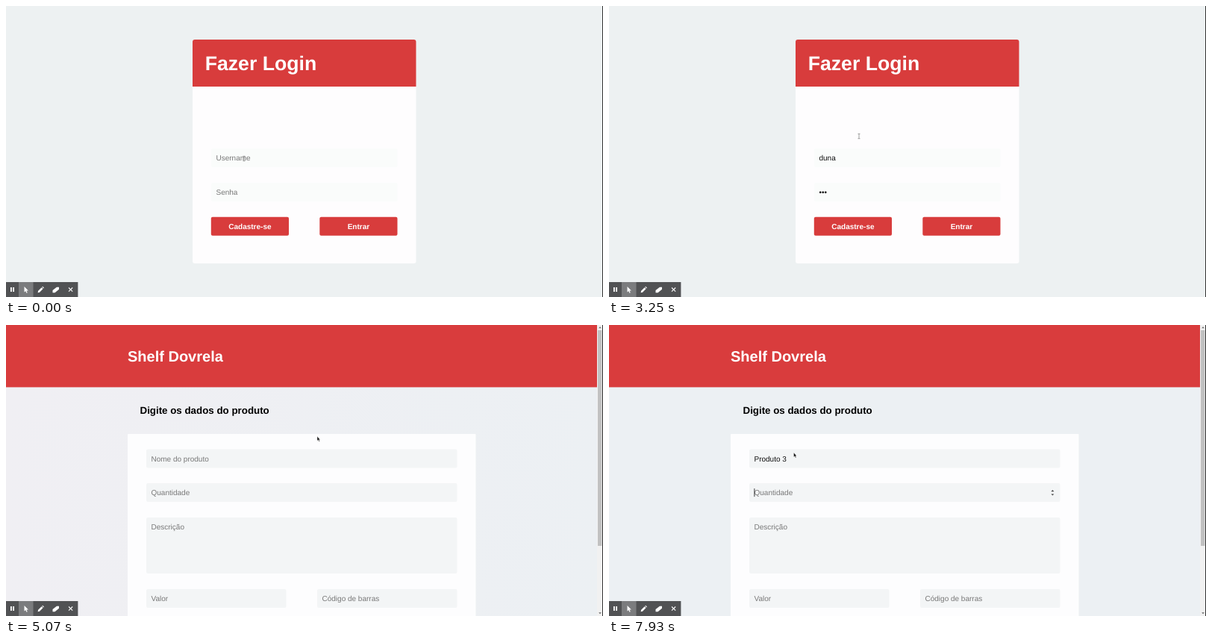
Animation, 800 px wide and 390 px high, one loop 8000 ms. Source, as an HTML page:

```html
<!DOCTYPE html>
<html lang="pt-BR">
<head>
<meta charset="utf-8">
<title>Login e cadastro</title>
<style>
html, body { margin: 0; width: 100%; height: 100%; overflow: hidden; }
svg { display: block; width: 100vw; height: 100vh; font-family: "Liberation Sans", Arial, sans-serif; }
text { white-space: pre; text-rendering: geometricPrecision; }
.b { font-weight: bold; }
.w { fill: #fff; }
.mid { text-anchor: middle; }
.end { text-anchor: end; }
.icon { fill: none; stroke-width: 1.1; stroke-linejoin: round; stroke-linecap: round; }
</style>
</head>
<body>
<svg id="stage" viewBox="0 0 800 390"></svg>
<script>
const LOOP = 8000, STEP = 130;
const LIST_AT = 3380, FORM_AT = 4810, TINT_AT = 6240;
const RED = '#d83c3c';

const rect = (x, y, w, h, fill, r = 0, more = '') =>
  `<rect x="${x}" y="${y}" width="${w}" height="${h}" fill="${fill}" rx="${r}" ${more}/>`;
const text = (x, y, size, str, cls = '', more = '') =>
  `<text x="${x}" y="${y}" font-size="${size}" class="${cls}" ${more}>${str}</text>`;
const path = (d, more = '') => `<path d="${d}" ${more}/>`;
const group = (id, body) => `<g id="${id}">${body}</g>`;

const field = (id, x, y, w, h, hint, fill = '#f3f5f6') =>
  rect(x, y, w, h, fill, 2) + text(x + 6.5, y + 16.1, 10, hint, '', `id="${id}" fill="#787878"`);
const button = (x, y, label, fill, id = '') =>
  rect(x, y, 104.2, 25, fill, 2, id && `id="${id}"`) + text(x + 52.1, y + 15.8, 10, label, 'b w mid');

function product(dy, name, stock, price, code) {
  const lines = [
    'Lorem ipsum dolor sit amet consectetur adipisicing elit. Ut odio quidem',
    'nobis aspernatur error est beatae, enim incidunt sed possimus deleniti',
    'magni! Dolores harum consectetur quod in nisi commodi sint.'
  ];
  const facts = [[210.7, 'Em estoque: ' + stock], [227.7, 'Valor: R$ ' + price],
    [244.7, 'Código de barras:'], [253.4, code]];
  const frame = y => rect(587.7, y, 24.8, 24.8, '#fff', 1.7, 'stroke="#e27c7c" stroke-width=".83"');
  return `<g transform="translate(0 ${dy})">` +
    rect(163, 191.5, 466.5, 76.5, '#fdfdfe', 1) +
    text(179.5, 211, 12.5, name, 'b') +
    lines.map((s, i) => text(179.5, 227.4 + i * 13.3, 7.5, s, '', 'fill="#111"')).join('') +
    facts.map(([y, s]) => text(542, y, 7.5, s, 'b end')).join('') +
    frame(199.8) + frame(233.8) +
    path('M600 207.5h-4v8h8v-4M598.6 213l.5-2 4.6-4.6 1.5 1.5-4.6 4.6z', 'class="icon" stroke="#2c9f2c"') +
    path('M596 242h8M598.5 242v-1.6h3v1.6M597 242v7.6h6V242', 'class="icon" stroke="#dc2030"') + '</g>';
}

const scrollbar = end =>
  rect(792, 0, 7, 390, '#f1f1f1') + rect(793, 7, 5.4, end - 7, '#c1c1c1') +
  path('M794.2 4.3l1.8-2 1.8 2z', 'fill="#666"') + path('M794.2 385.3l1.8 2 1.8-2z', 'fill="#666"');
const header = rect(0, 0, 792, 83.4, '#d93c3d') + text(163, 48.5, 20, 'Shelf Dovrela', 'b w');

const login = rect(0, 0, 800, 390, '#edf1f2') +
  rect(250, 45, 299.5, 300, '#fefdfe', 3) +
  path('M250 108V48a3 3 0 0 1 3-3h293.5a3 3 0 0 1 3 3v60z', `fill="${RED}"`) +
  text(266.7, 86, 26.67, 'Fazer Login', 'b w') +
  field('user', 275, 191, 249.5, 25, 'Username', '#fafcfb') +
  field('pass', 275, 237, 249.5, 25, 'Senha', '#fafcfb') +
  button(274.8, 282.7, 'Cadastre-se', RED) + button(420.3, 282.7, 'Entrar', RED);

const list = header + scrollbar(325) +
  button(525.2, 125, 'Cadastrar Produto', '#dc4b4b', 'add') +
  product(0, 'Produto 1', 3, '35.9', '494959') +
  product(80.8, 'Produto 2', 6, '15.0', '41949494');

const form = header + scrollbar(296) +
  text(179.5, 119, 13.33, 'Digite os dados do produto', 'b') +
  rect(163, 146, 466.5, 250, '#fdfdfe', 1) +
  field('name', 188, 166.5, 416.5, 25, 'Nome do produto') +
  field('qty', 188, 212, 416.5, 25, 'Quantidade') +
  field('desc', 188, 258, 416.5, 75, 'Descrição') +
  field('price', 188, 354, 187.5, 25, 'Valor') +
  field('code', 417, 354, 187.5, 25, 'Código de barras') +
  group('spin', path('M592.4 223.2l2-2.2 2 2.2zM592.4 226.4l2 2.2 2-2.2z', 'fill="#444"'));

const toolbar = rect(0, 370, 96.4, 20, '#515254') + rect(17, 370, 19.5, 20, '#7b7c7e') +
  rect(6, 377, 1.8, 6, '#fff') + rect(9.2, 377, 1.8, 6, '#fff') +
  path('M24.5 376v7.6l1.8-1.6 1.2 2.8 1.2-.5-1.2-2.7h2.4z', 'class="w"') +
  path('M42.6 384.2l.5-2.4 4.6-4.6 1.9 1.9-4.6 4.6zM48.3 376.6l.8-.8 1.9 1.9-.8.8z', 'class="w"') +
  path('M62.5 381l5.5-4.2h3v3l-5.5 4.4h-3z', 'class="w"') +
  path('M84 377.5l5.2 5.2M89.2 377.5l-5.2 5.2', 'stroke="#fff" stroke-width="1.1"');

const pointers =
  group('beam', path('M-1.5-3.2H1.5M0-3.2V3.2M-1.5 3.2H1.5', 'fill="none" stroke="#888" stroke-width=".8"')) +
  group('arrow', path('M0 0v6l1.4-1.2 1 2.2 1-.4-1-2.1H4z', 'fill="#111" stroke="#fff" stroke-width=".4"')) +
  group('hand', path('M-1 0.6Q0-.6.8.6V3.6L3.6 4.3V7L2.8 9.4H-1.2L-3 6.4-2.4 5.4-1 6.4z',
    'fill="#fff" stroke="#222" stroke-width=".7"'));

const $ = id => document.getElementById(id);
$('stage').innerHTML =
  '<linearGradient id="wash"><stop stop-color="#f0eff3"/><stop offset="1" stop-color="#ecf0f3"/></linearGradient>' +
  rect(0, 0, 800, 390, 'url(#wash)', 0, 'id="back"') +
  group('login', login) + group('list', list) + group('form', form) +
  rect(0, 0, 0.8, 11, '#111', 0, 'id="caret"') + group('pointer', pointers) +
  rect(799, 0, 1, 390, '#333') + toolbar;

const show = (id, on) => $(id).style.display = on ? '' : 'none';

// Pointer stops: time, x, y
const stops = [[0, 319, 204.5], [390, 320, 204.5], [2730, 320, 204.5], [3250, 335, 174.5],
  [3380, 327, 179.2], [3640, 330, 180], [4290, 567, 142], [4680, 567, 142],
  [5460, 267, 156.5], [5850, 247.5, 171], [LOOP, 247.5, 171]];

function pointerAt(t) {
  const i = stops.findIndex(s => s[0] > t), [t0, x0, y0] = stops[i - 1], [t1, x1, y1] = stops[i];
  const p = (t - t0) / (t1 - t0), e = p * p * (3 - 2 * p);
  return [x0 + (x1 - x0) * e, y0 + (y1 - y0) * e];
}

// Typed inputs: id, hint, value, focus, first key, gap between keys, blur
const inputs = [
  ['user', 'Username', 'duna', 260, 520, 130, 1170],
  ['pass', 'Senha', '•••', 1170, 1430, 260, 3250],
  ['name', 'Nome do produto', 'Produto 3', 6240, 6370, 91, 7410],
  ['qty', 'Quantidade', '', 7410, LOOP, 1, LOOP]
];

function type(t, [id, hint, value, focus, first, gap, blur]) {
  const el = $(id), n = t < first ? 0 : Math.floor((t - first) / gap) + 1;
  const typed = value.slice(0, n);
  el.textContent = typed || hint;
  el.setAttribute('fill', typed ? '#111' : '#787878');
  if (t < focus || t >= blur) return;
  const idle = t - (typed ? Math.min(t, first + (typed.length - 1) * gap) : focus);
  const caret = $('caret');
  show('caret', idle % 1060 < 530);
  caret.setAttribute('x', +el.getAttribute('x') + (typed ? el.getComputedTextLength() : 0));
  caret.setAttribute('y', el.getAttribute('y') - 9);
}

function draw(now) {
  const t = Math.floor(now % LOOP / STEP) * STEP;
  show('login', t < LIST_AT);
  show('list', t >= LIST_AT && t < FORM_AT);
  show('form', t >= FORM_AT);
  show('spin', t >= 7410);
  $('back').setAttribute('fill', t < TINT_AT ? 'url(#wash)' : '#ecf0f3');

  show('caret', false);
  inputs.filter(f => (f[3] >= FORM_AT) === (t >= FORM_AT)).forEach(f => type(t, f));

  const [x, y] = pointerAt(t);
  const over = t >= LIST_AT && t < FORM_AT && x > 525 && y < 150;
  $('add').setAttribute('fill', over ? '#dc5a5c' : '#dc4b4b');
  $('pointer').setAttribute('transform', `translate(${x} ${y})`);
  show('beam', t < LIST_AT);
  show('hand', over);
  show('arrow', t >= LIST_AT && !over);
  requestAnimationFrame(() => draw(performance.now() - start));
}

const start = performance.now();
draw(0);
</script>
</body>
</html>
```
